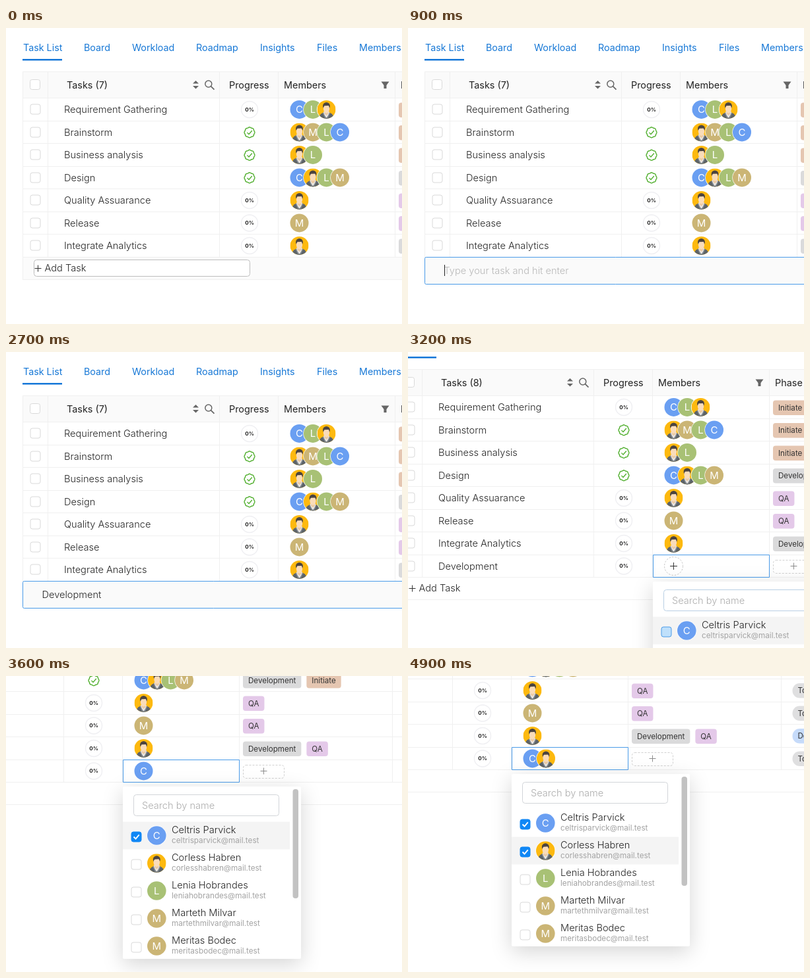
Write an HTML page with a canvas that moves like this. It is 600x450 px and loops after 5000 ms.

```html
<!DOCTYPE html>
<html lang="en">
<head>
<meta charset="utf-8">
<title>Task list</title>
<style>
  html, body { margin: 0; width: 100%; height: 100%; overflow: hidden; background: #fff; }
  canvas { display: block; width: 600px; height: 450px; }
</style>
</head>
<body>
<canvas id="stage" width="600" height="450"></canvas>
<script>
const ctx = document.getElementById('stage').getContext('2d');
const LOOP = 5000;
const FONT = 'Inter, "Open Sans", sans-serif';
const LINE = '#f0f0f0', INK = '#262626', BLUE = '#4a9be8', ACCENT = '#1087f5';

// Moments of the story, in ms
const OPEN = 750, TYPE = 1370, KEY = 75, ENTER = 2780, MENU = 2950;
const PAN_FROM = 3020, PAN_TO = 3722, PICK_1 = 3460, MOVE = 3760, PICK_2 = 4200;
const NEW_TASK = 'Development';

const TOP = 106.7, PITCH = 34.5, RIGHT = 1100;
const rowTop = i => Math.floor(TOP + PITCH * i) + 0.5;
const rowMid = i => TOP + PITCH * (i + 0.5);

const TABS = [['Task List', 26], ['Board', 118], ['Workload', 191], ['Roadmap', 288],
  ['Insights', 385], ['Files', 471], ['Members', 535]];
const DISC = { C: '#6a9ff2', L: '#a8c175', M: '#cbb575', P: '#fdb90f' };
const TAG = { Initiate: '#e5c6b1', Discovery: '#f1d3d3', Development: '#dadadb', QA: '#e4c9e9' };
const TASKS = [
  { name: 'Requirement Gathering', who: 'CLP', tags: ['Initiate', 'Discovery'] },
  { name: 'Brainstorm', who: 'PMLC', tags: ['Initiate'], done: true },
  { name: 'Business analysis', who: 'PL', tags: ['Initiate'], done: true },
  { name: 'Design', who: 'CPLM', tags: ['Development', 'Initiate'], done: true },
  { name: 'Quality Assuarance', who: 'P', tags: ['QA'] },
  { name: 'Release', who: 'M', tags: ['QA'] },
  { name: 'Integrate Analytics', who: 'P', tags: ['Development', 'QA'], doing: true }
];
const PEOPLE = [['C', 'Celtris Parvick'], ['P', 'Corless Habren'], ['L', 'Lenia Hobrandes'],
  ['M', 'Marteth Milvar'], ['M', 'Meritas Bodec']];

const clamp = v => Math.min(1, Math.max(0, v));
const smooth = u => u * u * (3 - 2 * u);

function text(s, x, mid, color = INK, size = 14.6, weight = 300, align = 'left') {
  ctx.font = `${weight} ${size}px ${FONT}`;
  ctx.textAlign = align;
  ctx.fillStyle = color;
  ctx.fillText(s, x, mid + size * 0.36);
}

function path(points, color, width = 1) {
  ctx.beginPath();
  points.forEach(([x, y]) => ctx.lineTo(x, y));
  ctx.strokeStyle = color;
  ctx.lineWidth = width;
  ctx.stroke();
}

function shape(points, color) {
  ctx.beginPath();
  points.forEach(([x, y]) => ctx.lineTo(x, y));
  ctx.fillStyle = color;
  ctx.fill();
}

const hline = (x1, x2, y, color = LINE) => path([[x1, y], [x2, y]], color);
const vline = (x, y1, y2, color = LINE) => path([[x, y1], [x, y2]], color);

function box(x, y, w, h, r, fill, stroke, dash = []) {
  ctx.beginPath();
  ctx.roundRect(x, y, w, h, r);
  if (fill) { ctx.fillStyle = fill; ctx.fill(); }
  if (!stroke) return;
  ctx.setLineDash(dash);
  ctx.strokeStyle = stroke;
  ctx.lineWidth = 1;
  ctx.stroke();
  ctx.setLineDash([]);
}

function ellipse(x, y, rx, ry, color) {
  ctx.beginPath();
  ctx.ellipse(x, y, rx, ry, 0, 0, 7);
  ctx.fillStyle = color;
  ctx.fill();
}

function plus(x, y, r, color) {
  hline(x - r, x + r, y, color);
  vline(x, y - r, y + r, color);
}

function checkbox(x, y, state) {
  const on = state === 'on';
  const fill = on ? ACCENT : state === 'press' ? '#bfe0fb' : '#fff';
  box(x - 7.5, y - 7.5, 15, 15, 3, fill, on ? ACCENT : state ? BLUE : '#d9d9d9');
  if (on) path([[x - 4, y], [x - 1, y + 3], [x + 4.2, y - 3.2]], '#fff', 1.9);
}

function person(x, y, r) {
  ctx.save();
  ctx.translate(x, y);
  ctx.scale(r / 14, r / 14);
  ctx.beginPath();
  ctx.arc(0, 0, 14, 0, 7);
  ctx.clip();
  ctx.fillStyle = DISC.P;
  ctx.fillRect(-14, -14, 28, 28);
  ellipse(0, 13, 11, 9.5, '#5c6369');
  shape([[-4, 3], [4, 3], [5, 6], [0, 13], [-5, 6]], '#e9e6e2');
  shape([[-2.8, 2], [2.8, 2], [3, 6], [0, 9], [-3, 6]], '#eccaa4');
  path([[-5, 5], [-1.2, 14]], '#858c92', 1.4);
  path([[5, 5], [1.2, 14]], '#858c92', 1.4);
  ellipse(0, -5.4, 5.4, 5.6, '#4b4440');
  ellipse(0, -1.2, 4.6, 6.6, '#f9dcba');
  shape([[-5.2, -3], [-4.6, -8], [2, -10], [5.2, -3], [3.4, -6], [-3, -5.6]], '#4b4440');
  ctx.restore();
}

function avatar(kind, x, y, r = 14) {
  ellipse(x, y, r + 0.7, r + 0.7, '#fff');
  if (kind === 'P') return person(x, y, r);
  ellipse(x, y, r, r, DISC[kind]);
  text(kind, x, y, '#fff', 15, 400, 'center');
}

function progress(y, done) {
  const x = 369;
  if (!done) {
    ctx.beginPath();
    ctx.arc(x, y, 12.5, 0, 7);
    ctx.strokeStyle = '#efeff2';
    ctx.lineWidth = 1.4;
    ctx.stroke();
    return text('0%', x, y - 0.3, '#222', 8, 700, 'center');
  }
  const rim = [];
  for (let a = 0; a <= 6.3; a += 0.1) {
    const r = 7.6 + 0.35 * Math.cos(8 * a);
    rim.push([x + r * Math.cos(a), y + 0.3 + r * Math.sin(a)]);
  }
  path(rim, '#4fae2c', 1.4);
  path([[x - 3.6, y + 0.4], [x - 1, y + 3], [x + 3.8, y - 2.4]], '#4fae2c', 1.3);
}

function pill(label, x, y, color, r) {
  ctx.font = `400 11.6px ${FONT}`;
  const w = ctx.measureText(label).width + 16;
  box(x, y - 11, w, 22.5, r, color);
  text(label, x + 8, y, '#333', 11.6, 400);
  return w;
}

function taskRow(task, i) {
  const y = rowMid(i);
  checkbox(44.5, Math.floor(y) + 0.5, '');
  text(task.name, 88, y);
  progress(y, task.done);
  [...task.who].forEach((k, n) => avatar(k, 444.5 + 20.5 * n, y));
  let x = 595;
  for (const tag of task.tags) x += pill(tag, x, y + 0.6, TAG[tag], 4) + 8;
  if (!task.tags.length) {
    box(595.5, Math.floor(y) - 8.5, 62, 20, 4, null, '#d0d0d0', [3, 2]);
    plus(626.5, Math.floor(y) + 0.5, 5, '#8c8c8c');
  }
  if (!task.who) {
    ctx.setLineDash([2.5, 2]);
    ctx.beginPath();
    ctx.arc(444.5, y, 14, 0, 7);
    ctx.strokeStyle = '#c6c6c6';
    ctx.lineWidth = 1;
    ctx.stroke();
    ctx.setLineDash([]);
    plus(444.5, Math.floor(y) + 0.5, 5.5, '#333');
  }
  pill(task.doing ? 'Doing' : 'To do', 838.5, y, task.doing ? '#c6dbfa' : '#dfdfe0', 11);
}

function header(count) {
  ctx.fillStyle = '#fafafa';
  ctx.fillRect(25, 66, RIGHT, 40);
  hline(25, RIGHT, 66.5);
  checkbox(44, 86, '');
  const head = (s, x) => text(s, x, 86.5, '#222', 14.4, 400);
  head(`Tasks (${count})`, 92);
  head('Progress', 338);
  head('Members', 421);
  head('Phase', 598);
  head('Status', 830);
  const gray = '#666';
  shape([[283, 84.5], [287.5, 80], [292, 84.5]], gray);
  shape([[283, 88], [287.5, 92.5], [292, 88]], gray);
  ctx.beginPath();
  ctx.arc(306.8, 85, 5, 0, 7);
  ctx.strokeStyle = gray;
  ctx.lineWidth = 1.5;
  ctx.stroke();
  path([[310.5, 88.7], [315.5, 93.6]], gray, 1.7);
  shape([[568.5, 81.5], [580.5, 81.5], [576.5, 87], [576.5, 92], [572.5, 92], [572.5, 87]], gray);
}

function table(rows, t) {
  const end = rowTop(rows.length), typing = t >= OPEN && t < ENTER;
  const bottom = typing ? end : end + 34;
  header(rows.length);
  if (t < OPEN) {
    ctx.fillStyle = '#fbfbfb';
    ctx.fillRect(25, end, RIGHT, 34);
  }
  if (!typing) hline(25, RIGHT, bottom);
  for (let i = 0; i <= rows.length; i++) hline(25, RIGHT, rowTop(i));
  vline(25.5, 66, bottom);
  for (const x of [63.5, 323.5, 412.5, 589.5, 821.5]) vline(x, 66, end);
  rows.forEach(taskRow);
  if (typing) return entry(t, end);
  if (t < OPEN) box(42.5, end + 4, 327, 25, 4, '#fff', '#bdbdbd');
  plus(48.5, end + 17, 5, '#333');
  text('Add Task', 58.5, end + 16.5);
}

function entry(t, y) {
  box(25.5, y, RIGHT, 41, 2, '#fafafa', BLUE);
  const n = Math.min(NEW_TASK.length, Math.max(0, Math.floor((t - TYPE) / KEY)));
  const typed = NEW_TASK.slice(0, n);
  text(typed || 'Type your task and hit enter', 54.5, y + 20.5, typed ? INK : '#b8b8b8');
  const since = t - (n ? TYPE + n * KEY : OPEN);
  if (since % 1000 < 500) {
    const x = Math.round(54.5 + (n ? ctx.measureText(typed).width : 0)) + 0.5;
    vline(x, y + 11.5, y + 28.5, '#222');
  }
}

function menu(t) {
  const x = 413, y = 389;
  box(413.5, rowTop(7), 176, PITCH - 0.5, 0, null, BLUE);
  ctx.save();
  ctx.shadowColor = 'rgba(0,0,0,.17)';
  ctx.shadowBlur = 32;
  ctx.shadowOffsetY = 8;
  box(x, y, 270, 262, 2, '#fff');
  ctx.restore();

  ctx.save();
  ctx.beginPath();
  ctx.rect(x, y, 270, 262);
  ctx.clip();
  box(429.5, 401.5, 220, 32, 4, '#fff', t < PICK_1 ? '#b9cfe4' : '#d2d5d9');
  text('Search by name', 442, 417.5, '#adadad');
  const fade = clamp((t - MOVE) / 260);
  PEOPLE.forEach(([kind, name], i) => {
    const top = 442.5 + 42 * i;
    const hover = i === 0 ? 1 - fade : i === 1 ? fade : 0;
    ctx.fillStyle = `rgba(0,0,0,${0.045 * hover})`;
    ctx.fillRect(x, top, 253, 42);
    let state = '';
    if (i === 0) state = t >= PICK_1 ? 'on' : 'press';
    if (i === 1 && t >= MOVE) state = t >= PICK_2 ? 'on' : 'hover';
    checkbox(433.5, Math.floor(top + 23) + 0.5, state);
    avatar(kind, 464.3, top + 21, 14.3);
    text(name, 487, top + 12);
    text(name.toLowerCase().replace(' ', '') + '@mail.test', 487, top + 28.5, '#a3a3a3', 11.7, 400);
  });
  box(670.5, 393, 8.5, 166, 4, '#c2c2c2');
  ctx.restore();
}

function draw(t) {
  ctx.fillStyle = '#fff';
  ctx.fillRect(0, 0, 600, 450);
  const p = smooth(clamp((t - PAN_FROM) / (PAN_TO - PAN_FROM)));
  ctx.save();
  ctx.translate(-Math.round(256 * p), -Math.round(240 * p));

  TABS.forEach(([s, x]) => text(s, x, 30, '#1778d6', 14.3, 400));
  ctx.fillStyle = '#1577d8';
  ctx.fillRect(25, 47, 60, 2.5);

  const rows = TASKS.slice();
  if (t >= ENTER) {
    const who = t >= PICK_2 ? 'CP' : t >= PICK_1 ? 'C' : '';
    rows.push({ name: NEW_TASK, who, tags: [] });
  }
  table(rows, t);
  if (t >= MENU) menu(t);
  ctx.restore();
}

const start = performance.now();
function tick() {
  draw((performance.now() - start) % LOOP);
  requestAnimationFrame(tick);
}
tick();
</script>
</body>
</html>
```
